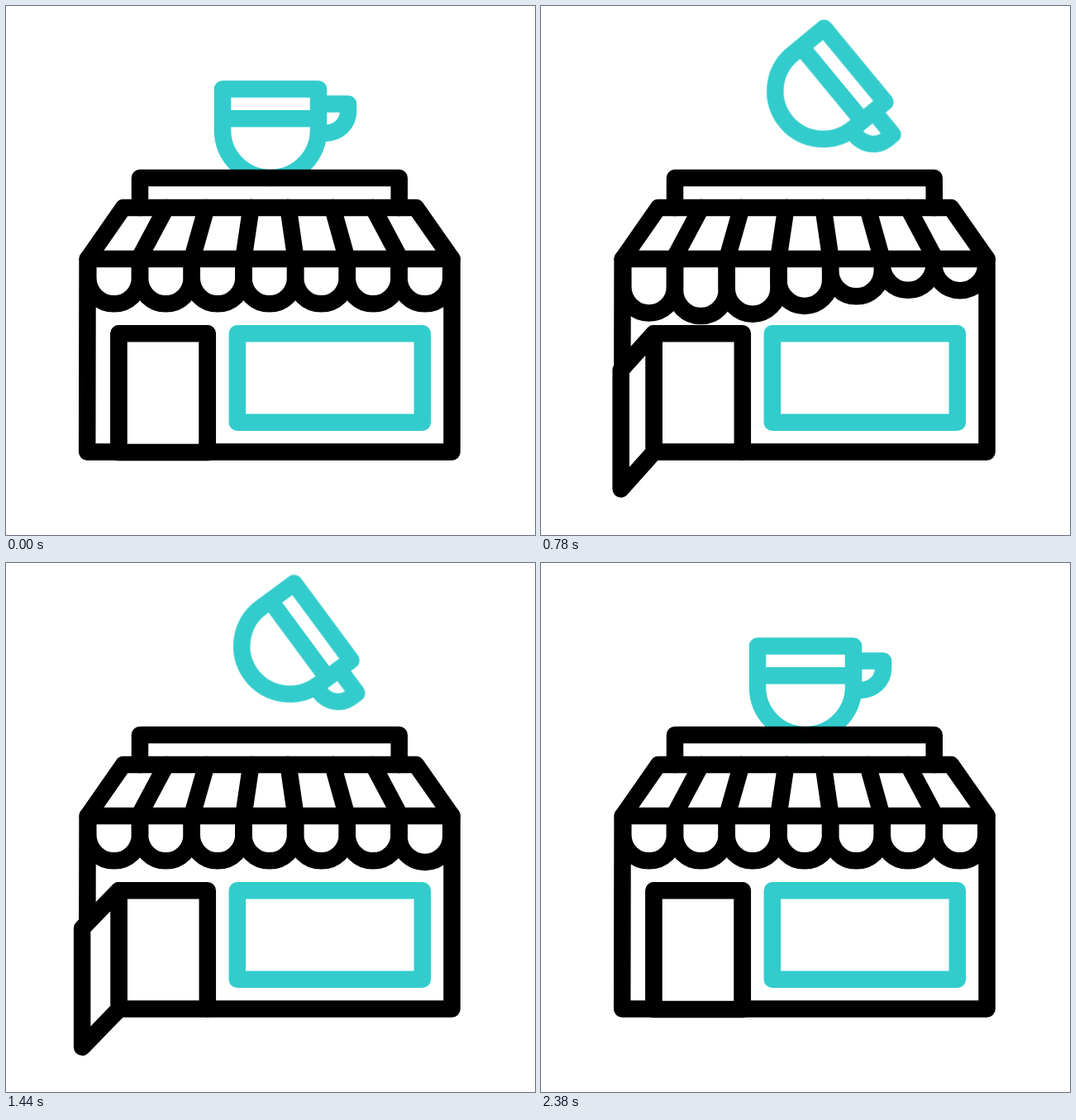
Recreate the animation shown at these times as an HTML page. Size 640 px wide and 640 px high, loop 2400 ms.

```html
<!DOCTYPE html>
<html lang="en">
<head>
<meta charset="utf-8">
<title>Coffee shop</title>
<style>
  html, body { margin: 0; width: 100%; height: 100%; overflow: hidden; background: #fff; }
  svg { display: block; width: 100%; height: 100%; }

  .line {
    fill: none; stroke: #000; stroke-width: 20.5;
    stroke-linecap: round; stroke-linejoin: round;
  }
  .teal { stroke: #33cccc; }

  .cup {
    transform-origin: 350px 150px;
    animation: tip 2400ms cubic-bezier(.8, 0, .2, 1) infinite;
  }
  .door {
    fill: #fff;
    animation: swing 2400ms cubic-bezier(.75, 0, .25, 1) infinite;
  }
  .flap {
    transform: translateX(calc(99.3px + var(--i) * 62.7px));
    animation: wave 2400ms cubic-bezier(.333, 0, .667, 1) calc(var(--i) * 85ms) infinite backwards;
  }

  @keyframes tip {
    0%, .67%, 99.3%, 100% { transform: translate(0px, 0px) rotate(0deg); }
    47.9%, 48.1% { transform: translate(11.5px, -26.4px) rotate(55.8deg); }
  }
  @keyframes swing {
    0%, .54%, 92%, 100% { d: path("M136.5 396.2L243.5 396.2L243.5 540L136.5 540Z"); }
    46.8%, 48.25% { d: path("M136.5 396.2L81.5 445L81.5 589L136.5 540Z"); }
  }
  @keyframes wave {
    0%, 1.25%, 41.67%, 100% { d: path("M0 306L0 329A31.35 31.35 0 0 0 62.7 329L62.7 306"); }
    12.92%, 13.75% { d: path("M0 306L0 312A31.35 31.35 0 0 0 62.7 312L62.7 306"); }
    27.92% { d: path("M0 306L0 344A31.35 31.35 0 0 0 62.7 344L62.7 306"); }
  }
</style>
</head>
<body>
<svg viewBox="0 0 640 640">
  <g class="line">
    <g class="cup teal">
      <path d="M262 100.5H378V150A58 58 0 0 1 262 150ZM262 136.3H378"/>
      <path d="M378 118.5H414V128A27 26 0 0 1 386 153.7"/>
    </g>

    <!-- sign board and awning -->
    <path d="M162 244V208H475.7V244"/>
    <path d="M142 244H496L539.5 306H98.8Z"/>
    <path d="M193.8 244L160.7 306M242.6 244L225 306M296.5 244L287.3 306
             M341.5 244L350.5 306M395.2 244L412.5 306M444 244L477 306"/>

    <!-- walls and window -->
    <path d="M98.6 306L98.2 539.5H539.5V306"/>
    <path class="teal" d="M279.8 396.2H503.8V503.8H279.8Z"/>

    <g>
      <path class="flap" style="--i:0" d="M0 306L0 329A31.35 31.35 0 0 0 62.7 329L62.7 306"/>
      <path class="flap" style="--i:1" d="M0 306L0 329A31.35 31.35 0 0 0 62.7 329L62.7 306"/>
      <path class="flap" style="--i:2" d="M0 306L0 329A31.35 31.35 0 0 0 62.7 329L62.7 306"/>
      <path class="flap" style="--i:3" d="M0 306L0 329A31.35 31.35 0 0 0 62.7 329L62.7 306"/>
      <path class="flap" style="--i:4" d="M0 306L0 329A31.35 31.35 0 0 0 62.7 329L62.7 306"/>
      <path class="flap" style="--i:5" d="M0 306L0 329A31.35 31.35 0 0 0 62.7 329L62.7 306"/>
      <path class="flap" style="--i:6" d="M0 306L0 329A31.35 31.35 0 0 0 62.7 329L62.7 306"/>
    </g>

    <!-- door frame and door -->
    <path d="M136.5 539.5V396.2H243.8V539.5"/>
    <path class="door" d="M136.5 396.2L243.5 396.2L243.5 540L136.5 540Z"/>
  </g>
</svg>
</body>
</html>
```
